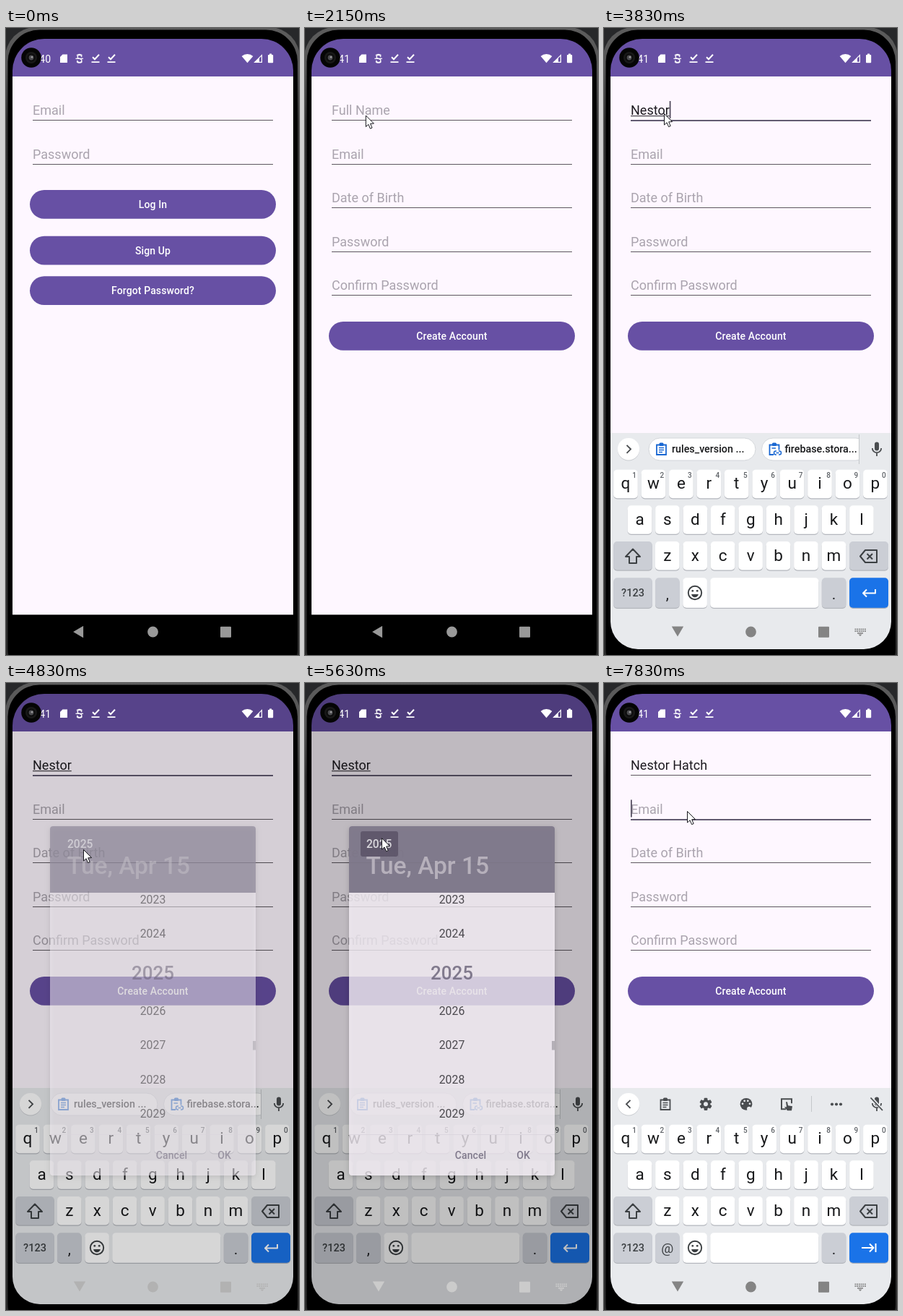
Animation of 406x867 px, one loop 8000 ms. Source, as an HTML page with a canvas:

```html
<!DOCTYPE html>
<html lang="en">
<head>
<meta charset="utf-8">
<title>Account sign-up</title>
<style>
html, body { margin: 0; width: 100%; height: 100%; overflow: hidden; background: #000; }
canvas { display: block; width: 406px; height: 867px; }
</style>
</head>
<body>
<canvas id="stage"></canvas>
<script>
const W = 406, H = 867, LOOP = 8000;
const cv = document.getElementById('stage');
const g = cv.getContext('2d');
const dpr = window.devicePixelRatio || 1;
cv.width = W * dpr;
cv.height = H * dpr;

const PURPLE = '#6750a4', ACCENT = '#625b71', PAGE = '#fef7ff', INK = '#1d1b20', HINT = '#aaa4ae';
const MID = 203.5;
const NAME = 'Nestor Hatch';

// Typing steps: time, letters shown, underline from, underline to
const TYPING = [
  [0, 0, 0, 0], [2890, 1, 0, 0], [3020, 1, 0, 1], [3170, 2, 0, 1], [3230, 4, 0, 3],
  [3430, 5, 0, 4], [3630, 6, 0, 5], [3830, 6, 0, 6], [6490, 7, 0, 6], [6690, 8, 7, 8],
  [6760, 9, 7, 9], [6830, 10, 7, 10], [6890, 11, 7, 11], [6960, 12, 7, 12], [7500, 12, 0, 0]
];

// Pointer moves: start, end, x, y reached
const MOVES = [
  [270, 270, 270, 662], [270, 800, 117, 266], [1200, 1320, 122, 300], [1450, 1660, 85, 124],
  [2040, 2240, 83, 118], [4100, 4400, 107, 230], [5560, 5860, 100, 118],
  [6090, 6160, 111, 122], [7160, 7400, 115, 177]
];

const clamp = v => Math.max(0, Math.min(1, v));
const span = (t, a, b) => b > a ? clamp((t - a) / (b - a)) : +(t >= a);
const smooth = p => p * p * (3 - 2 * p);
const mix = (a, b, p) => a + (b - a) * p;
const during = (t, a, b) => t >= a && t < b;

function rect(x, y, w, h, r, fill) {
  g.beginPath();
  g.roundRect(x, y, w, h, r);
  g.fillStyle = fill;
  g.fill();
}
function disc(x, y, r, fill) {
  g.beginPath();
  g.arc(x, y, r, 0, 7);
  g.fillStyle = fill;
  g.fill();
}
function poly(pts, fill) {
  g.beginPath();
  pts.forEach(p => g.lineTo(p[0], p[1]));
  g.closePath();
  g.fillStyle = fill;
  g.fill();
}
function draw(path, color, width = 1.6) {
  g.strokeStyle = color;
  g.lineWidth = width;
  g.stroke(new Path2D(path));
}
function text(s, x, y, size, color, weight = 400, align = 'left', gap = 0) {
  g.font = `${weight} ${size}px Roboto, "Noto Sans", sans-serif`;
  g.letterSpacing = gap + 'px';
  g.textAlign = align;
  g.fillStyle = color;
  g.fillText(s, x, y);
}
function layer(alpha, x, y, scale, fn) {
  if (alpha <= 0) return;
  g.save();
  g.globalAlpha *= alpha;
  g.translate(x, y);
  g.scale(scale, scale);
  g.translate(-x, -y);
  fn();
  g.restore();
}
function icon(x, y, fn) {
  g.save();
  g.translate(x, y);
  fn();
  g.restore();
}

// Phone shell

function shell() {
  g.fillStyle = '#27282a';
  g.fillRect(0, 0, W, H);
  const shine = g.createLinearGradient(0, 0, 0, H);
  shine.addColorStop(0, '#5c5c5c');
  shine.addColorStop(.06, '#555');
  shine.addColorStop(.15, '#2e2e2e');
  shine.addColorStop(1, '#2a2a2a');
  rect(-1, -1, 408, 900, 42, shine);
  rect(2.5, 2.5, 401.5, 900, 44, '#000');
}

function statusIcons(t) {
  const w = '#fff';
  text(t < 1400 ? '40' : '41', 46.3, 48, 14, w);
  poly([[78.5, 36.5], [85, 36.5], [85, 48], [75, 48], [75, 40]], w);
  text('S', 101.7, 47.6, 14.5, w, 400, 'center');
  draw('M96.5 42.3H107M98 38A5 5 0 0 1 105.5 38M98 46.5A5 5 0 0 0 105.5 46.5', w, 1.2);
  for (const x of [124, 146]) {
    draw(`M${x - 4} 40.2L${x - 1} 43.2L${x + 5} 36.8`, w, 2);
    draw(`M${x - 5.5} 47.2H${x + 5.5}`, w, 1.8);
  }
  g.beginPath();
  g.moveTo(334.5, 48.3);
  g.arc(334.5, 48.3, 12.2, -2.27, -.87);
  g.closePath();
  g.fillStyle = w;
  g.fill();
  draw('M354.4 37.6V47.4H344.6Z', w, 1.2);
  poly([[351, 41], [351, 48], [344, 48]], w);
  rect(363, 37, 7.2, 11.3, 1, w);
  rect(365, 35.4, 3.2, 2.5, .5, w);
}

function camera() {
  disc(35, 41, 13.8, '#050505');
  disc(35, 41, 8, '#191919');
  disc(35, 41, 5.5, '#0c0c0c');
  disc(35, 41, 3.4, '#4c4c50');
  disc(36, 40.2, 1.3, '#a0a0a0');
}

// Pages

function pageBase() {
  g.fillStyle = '#000';
  g.fillRect(9, 811, 389, 60);
  g.fillStyle = PAGE;
  g.fillRect(9, 67, 389, 744.3);
  g.fillStyle = PURPLE;
  g.fillRect(9, 10, 389, 57);
}

function field(i, label, active, value = '') {
  const y = i * 60.5;
  text(value || label, 37, y + 120.3, 18, value ? INK : HINT);
  g.fillStyle = active ? ACCENT : '#5d585f';
  g.fillRect(37, Math.round(y + 127), 333, active ? 2 : 1);
}

function button(y, label, glow = 0, ripple = 0) {
  rect(33, y, 341, 39.7, 19.85, PURPLE);
  if (glow > 0) {
    g.save();
    g.clip();
    disc(mix(122, MID, ripple), y + 20, mix(10, 190, ripple), `rgba(255,255,255,${.09 * glow})`);
    g.restore();
  }
  text(label, MID, y + 25, 14, '#fff', 500, 'center', .1);
}

function loginPage(t) {
  pageBase();
  field(0, 'Email');
  field(1, 'Password');
  button(224, 'Log In');
  button(287.7, 'Sign Up', span(t, 1330, 1400), smooth(span(t, 1330, 1600)));
  button(343.3, 'Forgot Password?');
}

function caret(x, y) {
  g.fillStyle = '#4d4659';
  g.fillRect(x, y, 1.7, 24);
}

function signupPage(t) {
  const step = TYPING.filter(s => s[0] <= t).pop();
  const value = NAME.slice(0, step[1]);
  const onEmail = t >= 7500;
  pageBase();
  field(0, 'Full Name', t >= 2340 && !onEmail, value);
  field(1, 'Email', onEmail);
  field(2, 'Date of Birth', during(t, 4420, 4760));
  field(3, 'Password');
  field(4, 'Confirm Password');
  button(406, 'Create Account');

  g.font = '400 18px Roboto, "Noto Sans", sans-serif';
  g.letterSpacing = '0px';
  const width = n => g.measureText(NAME.slice(0, n)).width;
  const from = width(step[2]), to = width(step[3]);
  g.fillStyle = INK;
  g.fillRect(37 + from, 121.2, to - from, 1);
  if (onEmail) caret(37, 161.5);
  else if (during(t, 2400, 4100) || during(t, 6090, 6160) || t >= 6490)
    caret(37 + width(step[1]), 101);
}

// Keyboard

const GREY = '#4a4d50', BLUE = '#1a73e8';

function key(x, y, w, fill = '#fff', h = 39.5) {
  rect(x, y + 1.2, w, h, 5, '#b4b7bd');
  rect(x, y, w, h, 5, fill);
}

function keyRow(letters, x, y, digits) {
  [...letters].forEach((c, i) => {
    const kx = x + i * 38.43;
    key(kx, y, 33.6);
    text(c, kx + 16.8, y + 26.6, 22.5, '#17181a', 400, 'center');
    if (digits) text((i + 1) % 10, kx + 28.8, y + 10.8, 10, '#5f6368', 500, 'center');
  });
}

function clipboard(color, link) {
  draw('M-6.5 -6H6.5V7.5H-6.5Z', color, 1.8);
  rect(-3, -9, 6, 4.5, 1.5, color);
  if (link) {
    rect(-1, 1, 10, 8, 0, '#fff');
    draw('M3 2.5H2A2.5 2.5 0 0 0 2 7.5H3M6 2.5H7A2.5 2.5 0 0 1 7 7.5H6M2.5 5H6.5', color, 1.5);
    draw('M-3.5 -1.5H2', color, 1.4);
  } else draw('M-3.5 -2H3.5M-3.5 1H3.5M-3.5 4H1.5', color, 1.4);
}

function chip(x, w, label, link) {
  rect(x, 567, w, 31, 15.5, '#fff');
  g.strokeStyle = '#d3d6da';
  g.lineWidth = 1;
  g.stroke();
  icon(x + 17.5, 582.5, () => clipboard('#1967d2', link));
  text(label, x + 32, 587.3, 14.3, '#17181a', 500);
}

function mic(off) {
  rect(375, 572.5, 6, 12, 3, GREY);
  draw('M371.8 581A6.2 6.2 0 0 0 384.2 581M378 587V592', GREY, 1.8);
  if (off) {
    draw('M370.5 573.5L386 590.5', '#e8eaed', 4);
    draw('M369.5 573.5L386 591', GREY, 1.8);
  }
}

function tools() {
  icon(85, 582.5, () => clipboard(GREY));
  icon(141, 582.3, () => {
    for (let i = 0; i < 6; i++) {
      g.rotate(Math.PI / 3);
      rect(-2.4, -8.6, 4.8, 5, 1, GREY);
    }
    disc(0, 0, 6.4, GREY);
    disc(0, 0, 3, '#e8eaed');
  });
  icon(197, 582.3, () => {
    disc(0, 0, 8.4, GREY);
    for (const [x, y] of [[-5, -.5], [-2.3, -4.5], [2.3, -4.5], [5, -.5]]) disc(x, y, 1.4, '#e8eaed');
    disc(4, 6.5, 3, '#e8eaed');
  });
  icon(253, 582.3, () => {
    draw('M7 -1V-7H-7V7H-1', GREY, 2);
    poly([[-1, -3], [1, -3], [2, 2], [8, 3], [7, 9], [1, 9], [-3, 4], [0, 4]], GREY);
  });
  g.fillStyle = '#c4c7ca';
  g.fillRect(287, 571, 1, 22);
  for (const x of [316, 322, 328]) disc(x, 582.5, 2.1, GREY);
}

function keyboard(t) {
  const swap = span(t, 7560, 7760);
  const emailKeys = t >= 7560;
  g.save();
  g.translate(0, 300 * Math.pow(1 - span(t, 2340, 2760), 3));
  g.fillStyle = '#e8eaed';
  g.fillRect(9, 560, 389, 310);

  g.save();
  g.beginPath();
  g.rect(9, 560, 344, 45);
  g.clip();
  const grow1 = span(t, 2480, 2630), grow2 = span(t, 2540, 2740);
  layer(Math.min(1, grow1 * 3) * (1 - swap), 136, 582.5, mix(.66, 1, grow1),
    () => chip(62, 148, 'rules_version ...', false));
  layer(Math.min(1, grow2 * 3) * (1 - swap), 291.5, 582.5, mix(.66, 1, grow2),
    () => chip(218.5, 146, 'firebase.stora...', true));
  g.restore();
  layer(1 - swap, 0, 0, 1, () => {
    g.fillStyle = '#c4c7ca';
    g.fillRect(353, 562, 1, 41);
  });
  layer(swap, 0, 0, 1, tools);

  disc(34, 583.2, 15.2, '#c9ccd0');
  disc(34, 582.3, 15.2, '#fff');
  icon(34, 582.3, () => {
    g.scale(swap > .5 ? -1 : 1, 1);
    draw('M-2.5 -5.5L3 0L-2.5 5.5', GREY, 1.9);
  });
  mic(emailKeys);

  const tone = '#cbced5';
  keyRow('qwertyuiop', 13.2, 610.8, true);
  keyRow('asdfghjkl', 32.7, 660.3);
  keyRow('zxcvbnm', 71, 710);
  key(13.2, 710, 53.6, tone);
  key(340, 710, 54, tone);
  key(13.2, 760.3, 53.6, tone, 41.5);
  key(71, 760.3, 33.6, tone, 41.5);
  key(109.3, 760.3, 33.6, '#fff', 41.5);
  key(147.2, 760.3, 150.2, '#fff', 41.5);
  key(301.8, 760.3, 33.6, tone, 41.5);
  key(340, 760.3, 54, BLUE, 41.5);

  g.lineJoin = 'round';
  draw('M40 720.5L50 731H45V740H35V731H30Z', '#3c4043', 2);
  draw('M362 722H378V739H362L355 730.5Z', '#3c4043', 2);
  draw('M364.5 727L372 734.5M372 727L364.5 734.5', '#3c4043', 2);
  text('?123', 40, 786.3, 14.5, '#3c4043', 500, 'center');
  if (emailKeys) text('@', 87.8, 788, 19, '#3c4043', 400, 'center');
  else text(',', 87.8, 790, 21, '#202124', 400, 'center');
  text('.', 318.6, 790, 21, '#202124', 400, 'center');
  draw('M135.2 781A9.2 9.2 0 1 1 116.8 781A9.2 9.2 0 1 1 135.2 781', '#3c4043', 1.9);
  g.beginPath();
  g.arc(126, 782.3, 4.9, .15, Math.PI - .15);
  g.fillStyle = '#3c4043';
  g.fill();
  disc(122.8, 778.3, 1.4, '#3c4043');
  disc(129.2, 778.3, 1.4, '#3c4043');
  if (emailKeys) draw('M357 781H373M368 775.5L373.5 781L368 786.5M376.5 775V787', '#fff', 2);
  else draw('M376 776V781.5H359M364 776.5L359 781.5L364 786.5', '#fff', 2);
  g.lineJoin = 'miter';
  g.restore();
}

function navIcons(t, dim) {
  const p = span(t, 2480, 2760);
  const v = Math.round(mix(mix(153, 132, p), 224, dim));
  const color = `rgb(${v},${v},${v})`;
  icon(102 - .5 * (1 - p), 835 - 1.8 * p, () => {
    g.rotate(-p * Math.PI / 2);
    poly([[-8.4, 0], [5.6, -8.2], [5.6, 8.2]], color);
  });
  disc(MID, 835, 7.4, color);
  rect(297, 827.7, 15, 15, 1, color);
  layer(p, 355, 835, 1, () => {
    g.fillStyle = color;
    for (let r = 0; r < 2; r++)
      for (let c = 0; c < 6; c++) g.fillRect(347.5 + c * 2.7, 830.5 + r * 2.7, 1.8, 1.8);
    g.fillRect(351, 836, 8, 1.6);
    poly([[352.5, 838.6], [357.5, 838.6], [355, 841]], color);
  });
}

// Date dialog

function dialog(t) {
  g.save();
  g.shadowColor = 'rgba(0,0,0,.22)';
  g.shadowBlur = 7 * dpr;
  g.shadowOffsetY = 2 * dpr;
  rect(61, 198, 285, 483, 4, PAGE);
  g.restore();
  rect(61, 198, 285, 92, [4, 4, 0, 0], ACCENT);
  layer(span(t, 5060, 5300), 0, 0, 1, () => rect(77, 205, 52, 35, 3, '#574f63'));
  text('2025', 85, 228.3, 15.6, '#fff', 500);
  text('Tue, Apr 15', 84.6, 263.7, 33.6, '#c6c1ca', 500);
  [[2023, 299.5], [2024, 347], [2026, 453.5], [2027, 501], [2028, 548.5], [2029, 596]]
    .forEach(([year, y]) => text(year, MID, y + 5.3, 15.8, INK, 400, 'center'));
  text('2025', MID, 410.2, 26, ACCENT, 500, 'center');
  g.fillStyle = '#a5a0a8';
  g.fillRect(342, 495, 4, 12.5);
  g.fillStyle = '#d9d3dc';
  g.fillRect(61, 624, 285, 1);
  text('Cancel', 229.5, 658.2, 14, ACCENT, 500, 'center', .1);
  text('OK', 302.5, 658.2, 14, ACCENT, 500, 'center', .1);
}

function pointer(t) {
  if (t < 270) return;
  let [, , x, y] = MOVES[0];
  for (const [a, b, nx, ny] of MOVES.slice(1)) {
    const p = smooth(span(t, a, b));
    x = mix(x, nx, p);
    y = mix(y, ny, p);
  }
  icon(x, y, () => {
    poly([[.5, .5], [.5, 16], [4.1, 12.8], [6.6, 18.6], [9.2, 17.5], [6.7, 11.8], [11.6, 11.6]], '#fff');
    g.strokeStyle = '#16161c';
    g.lineWidth = 1;
    g.stroke();
  });
}

function render(t) {
  g.setTransform(dpr, 0, 0, dpr, 0, 0);
  shell();
  g.save();
  g.beginPath();
  g.roundRect(9, 15, 389, 844, [44, 44, 38, 38]);
  g.clip();

  const open = span(t, 1640, 1960), e = smooth(open);
  if (open < 1) layer(1, MID, 437, 1 + .15 * e, () => loginPage(t));
  layer(span(open, .12, .55), MID, 437, mix(.85, 1, e), () => signupPage(t));
  if (t > 2340) keyboard(t);

  const dim = span(t, 4720, 4940) * (1 - span(t, 5580, 5800));
  if (dim > 0) {
    g.fillStyle = `rgba(0,0,0,${.32 * dim})`;
    g.fillRect(0, 0, W, H);
  }
  statusIcons(t);
  navIcons(t, dim);
  layer(dim, 0, 0, 1, () => dialog(t));
  g.restore();
  camera();
  pointer(t);
}

const start = performance.now();
function tick() {
  render((performance.now() - start) % LOOP);
  requestAnimationFrame(tick);
}
tick();
</script>
</body>
</html>
```
